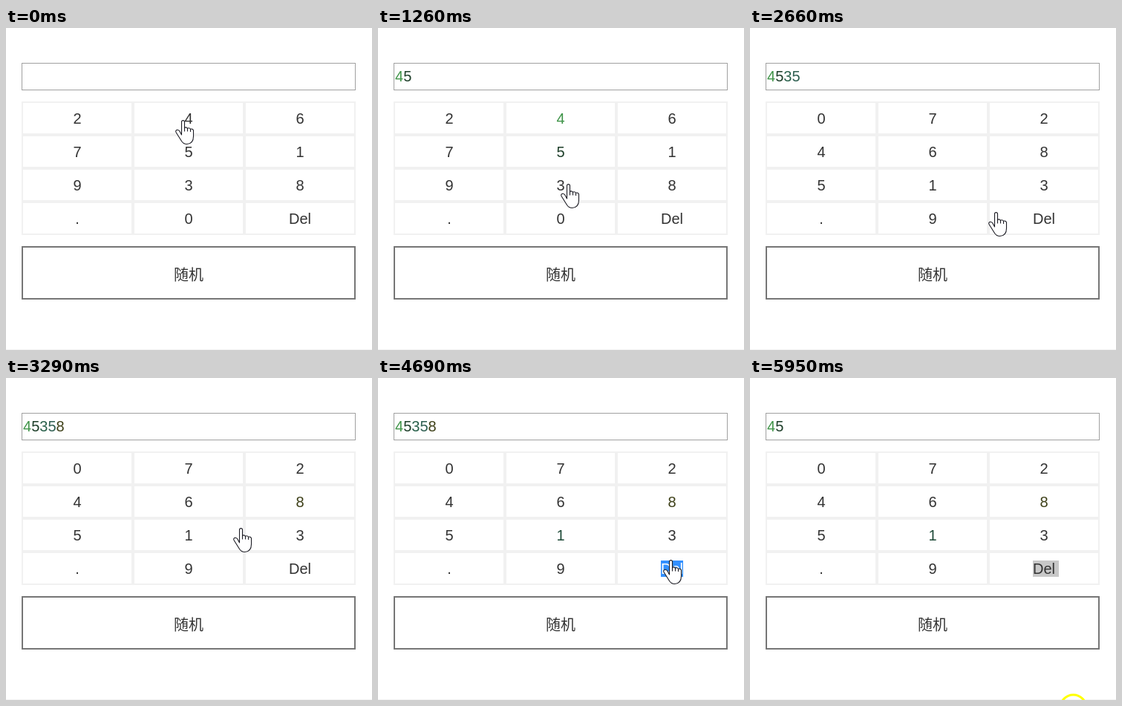
These frames come from a looping animation (493x434 px, 6020 ms). An HTML page:

```html
<!DOCTYPE html>
<html lang="zh">
<head>
<meta charset="utf-8">
<title>Random keypad</title>
<style>
  html, body { margin: 0; width: 100%; height: 100%; overflow: hidden; background: #fff; }
  svg { display: block; }
  text { font: 20px "Liberation Sans", Arial, sans-serif; fill: #333; white-space: pre; }
  .cjk { font-family: "Noto Sans CJK SC", "Noto Sans CJK", sans-serif; }
  .mid { text-anchor: middle; }
</style>
</head>
<body>
<svg width="493" height="434" viewBox="0 0 493 434">
  <path d="M0 433.5H493" stroke="#f3f3f3"/>
  <rect x="21.5" y="47.5" width="449" height="36" fill="#fff" stroke="#a0a0a0"/>
  <text id="entry" x="23" y="72"></text>
  <g id="keys" stroke="#f1f1f1" stroke-width="2"></g>
  <rect id="selection" x="381" y="246" height="22"/>
  <g id="labels" class="mid"></g>
  <rect x="22" y="295" width="448" height="70" fill="#fff" stroke="#767676" stroke-width="2"/>
  <text class="cjk mid" x="246" y="339.5">随机</text>
  <g id="hand" stroke="#1c1c24" stroke-width="1.1" stroke-linejoin="round" stroke-linecap="round">
    <path fill="#fff" d="M8.5 20V2.6a2 2 0 0 1 4 0V10.5q2.2-1.6 4 .8q2.4-1.4 4 1q3-1 4 1.7V22q0 10-9 10.5q-4.5 0-7-4L1.3 17q-1.5-2.6 .7-3.6q2-.6 3.5 1.2z"/>
    <path fill="none" d="M12.5 10.5V15M16.5 11.3V15M20.5 12.3V15.5"/>
  </g>
  <circle id="ring" cx="435.5" cy="444.5" r="17.5" fill="none" stroke="#ff0" stroke-width="3"/>
</svg>
<script>
const LOOP = 6020, STEP = 70, SHUFFLE = 2450;
const DELETE_START = 4550, DELETE_GAP = 210, DELETE_COUNT = 4;
const $ = id => document.getElementById(id);

// The hand eases from stop to stop: time, left, top
const stops = [
  [490, 228, 124], [840, 193, 168], [1260, 246, 210], [1680, 291, 165], [2100, 269, 311],
  [2380, 272, 331], [2940, 370, 165], [3290, 306, 202], [3500, 300, 202], [3850, 322, 354],
  [4060, 343, 311], [4410, 385, 245], [5250, 382, 245], [5320, 382, 273], [5600, 430, 440]
];

// Each pressed digit tints its key and its place in the entry
const presses = [
  { at: 490, key: "4", color: "#3f9448" },
  { at: 980, key: "5", color: "#1e3f2a" },
  { at: 1400, key: "3", color: "#28604a" },
  { at: 1750, key: "5", color: "#2f5f52" },
  { at: 3080, key: "8", color: "#3e4018" },
  { at: 3500, key: "1", color: "#1e4a38" }
];
const layouts = ["2 4 6 7 5 1 9 3 8 . 0 Del", "0 7 2 4 6 8 5 1 3 . 9 Del"].map(s => s.split(" "));

function add(id, tag, attrs) {
  const el = document.createElementNS("http://www.w3.org/2000/svg", tag);
  for (const name in attrs) el.setAttribute(name, attrs[name]);
  return $(id).appendChild(el);
}

const labels = layouts[0].map((_, i) => {
  const x = 21 + i % 3 * 150, y = 99 + Math.floor(i / 3) * 45;
  add("keys", "rect", { x: x + 1, y: y + 1, width: 148, height: 43, fill: "#fff" });
  return add("labels", "text", { x: x + 75, y: y + 30 });
});
const digits = presses.map(({ color }) => add("entry", "tspan", { style: `fill:${color}` }));

const clamp = (v, lo, hi) => Math.min(hi, Math.max(lo, v));

function handAt(t) {
  const i = clamp(stops.findIndex(([time]) => time > t), 1, stops.length - 1);
  const [t0, x0, y0] = stops[i - 1], [t1, x1, y1] = stops[i];
  const p = clamp((t - t0) / (t1 - t0), 0, 1), k = p * p * (3 - 2 * p);
  return [x0 + (x1 - x0) * k, y0 + (y1 - y0) * k].map(Math.round);
}

function render(t) {
  const pressed = presses.filter(p => p.at <= t);
  const deleted = clamp(Math.floor((t - DELETE_START) / DELETE_GAP) + 1, 0, DELETE_COUNT);
  digits.forEach((d, i) => d.textContent = i < pressed.length - deleted ? presses[i].key : "");

  const shuffled = t >= SHUFFLE;
  const colors = {};
  for (const { at, key, color } of pressed)
    if (at >= SHUFFLE === shuffled) colors[key] = color;

  // A double click selects the word, a triple click the whole line
  const selected = t >= 4690, blurred = t >= 5880;
  if (selected && !blurred) colors.Del = "#fff";
  $("selection").setAttribute("width", !selected ? 0 : t < 4900 ? 30 : 35);
  $("selection").setAttribute("fill", blurred ? "#c8c8c8" : "#3390ff");
  labels.forEach((label, i) => {
    const key = layouts[+shuffled][i];
    label.textContent = key;
    label.style.fill = colors[key] || "#333";
  });

  // The hand is out of sight after its last stop
  const last = stops[stops.length - 1][0];
  $("hand").style.display = t > last ? "none" : "";
  $("hand").setAttribute("transform", `translate(${t < stops[0][0] ? stops[0].slice(1) : handAt(t)})`);
  $("ring").style.display = t >= 5950 ? "" : "none";
}

const start = performance.now();
function tick() {
  const t = (performance.now() - start) % LOOP;
  render(Math.floor(t / STEP) * STEP);
  requestAnimationFrame(tick);
}
tick();
</script>
</body>
</html>
```
